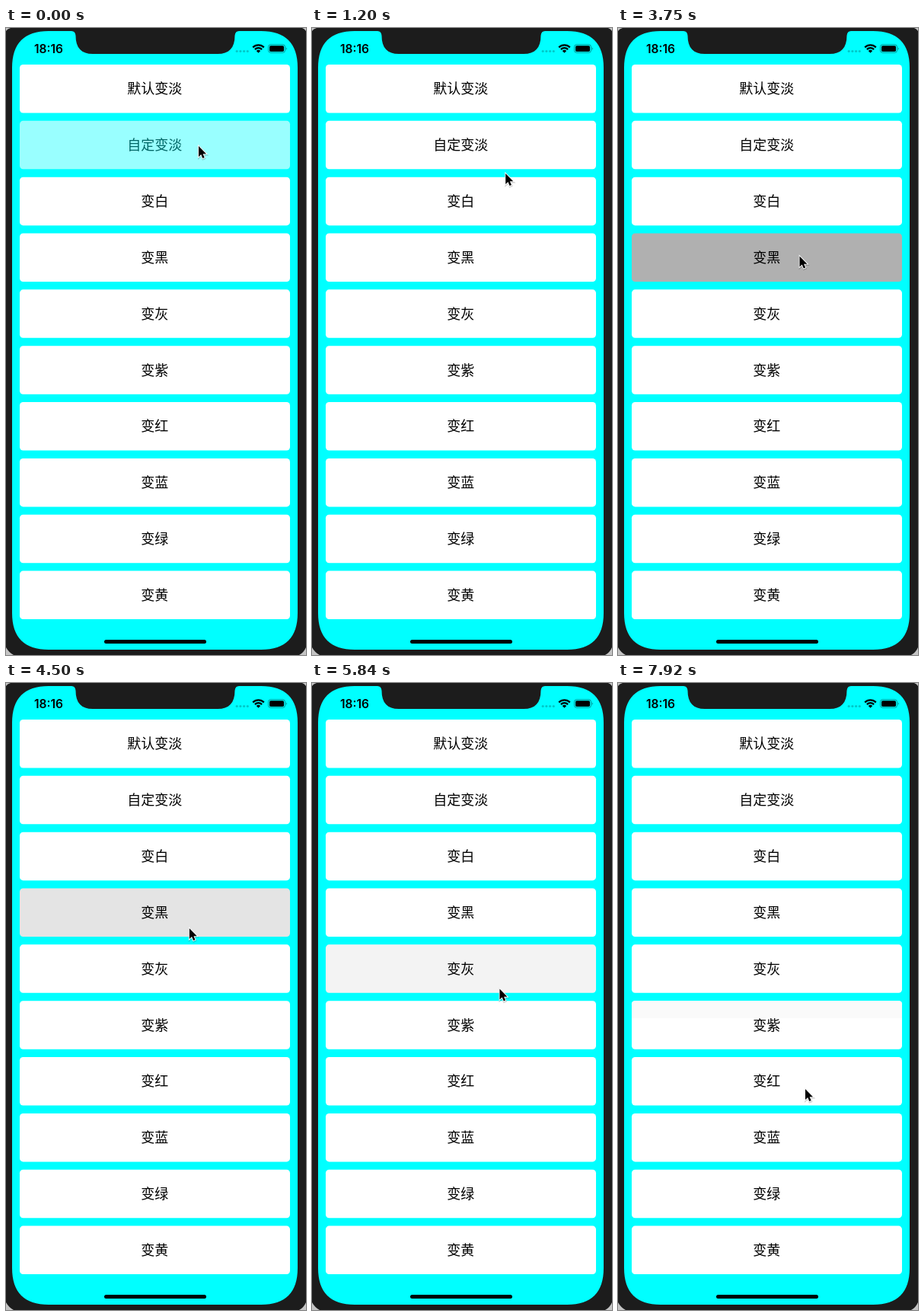
Animation, 394 px wide and 823 px high, one loop 8 s. Source, as an HTML page:

```html
<!DOCTYPE html>
<html lang="zh-CN">
<head>
<meta charset="utf-8">
<title>按钮高亮</title>
<style>
  html, body { margin: 0; width: 100%; height: 100%; overflow: hidden; background: #1c1c1c; }
  svg { display: block; width: 394px; height: 823px; }
  text { text-anchor: middle; }
  .label { font: 18px "Noto Sans CJK SC", "Noto Sans CJK", sans-serif; }
  .clock { font: 600 15.5px Inter, sans-serif; }
</style>
</head>
<body>
<svg viewBox="0 0 394 823">
  <rect width="394" height="823" fill="#1c1c1c"/>
  <path fill="#c4c4c4" d="M0 0H6Q2 1 0 4ZM394 0H389Q392 1 394 4ZM0 823V813Q4 820 10 823ZM394 823V813Q391 820 385 823Z"/>
  <path fill="#0ff" d="M8 52C8 20 24 4 56 4H86Q91 4 91.5 10C91.5 26 99 34 114 34H278C293 34 300.500 26 300.500 10Q301 4 306 4H335C367 4 383 20 383 52V768C383 800 367 816 335 816H56C24 816 8 800 8 768Z"/>
  <text class="clock" x="56" y="32.500">18:16</text>
  <g fill="#000" fill-opacity=".22">
    <circle cx="303.200" cy="30.500" r="1.600"/><circle cx="307.900" cy="30.500" r="1.600"/>
    <circle cx="312.600" cy="30.500" r="1.600"/><circle cx="317.300" cy="30.500" r="1.600"/>
  </g>
  <g transform="translate(331.500 32.700)">
    <path d="M0 0L-2.700 -2.700A3.800 3.800 0 0 1 2.700 -2.700Z"/>
    <path fill="none" stroke="#000" stroke-width="2.200" d="M-4.600 -4.600A6.500 6.500 0 0 1 4.600 -4.600M-7.300 -7.300A10.300 10.300 0 0 1 7.300 -7.300"/>
  </g>
  <rect x="344.500" y="21.800" width="22" height="10.600" rx="3" fill="none" stroke="#000" stroke-opacity=".4"/>
  <rect x="346" y="23.300" width="19" height="7.600" rx="1.700"/>
  <path fill-opacity=".45" d="M367.800 25.200Q370 27 367.800 29Z"/>
  <rect x="129" y="803" width="134" height="5" rx="2.500"/>
  <g id="rows"></g>
  <g id="cursor">
    <path fill="none" stroke="#000" stroke-opacity=".18" stroke-width="2.500" transform="translate(.3 1)" d="M0 0V14L3.200 11L5.300 16L7.700 15L5.600 10.200H10Z"/>
    <path stroke="#fff" stroke-width="1.800" paint-order="stroke" d="M0 0V14L3.200 11L5.300 16L7.700 15L5.600 10.200H10Z"/>
  </g>
</svg>
<script>
const LOOP = 8000, STEP = 150;
const CLOCK_ORIGINS = [0, 5090, 6430, 7920];
const LABELS = ['默认变淡', '自定变淡', '变白', '变黑', '变灰', '变紫', '变红', '变蓝', '变绿', '变黄'];

// Each press tints its row, or fades the whole row when it has no tint.
const PRESSES = [
  { row: 1, down: -123, up: 719 },
  { row: 3, down: 3634, up: 4325, tint: [128, 128, 128] },
  { row: 4, down: 5028, up: 5660, tint: [192, 192, 192] },
  { row: 5, down: 6360, up: 7150, tint: [192, 128, 192] },
];

// time, x, y of the pointer tip
const POINTER = [
  [0, 253, 155], [900, 253, 155], [1500, 255.5, 227],
  [2400, 255.5, 227], [2550, 254.5, 227], [2950, 211, 265],
  [3150, 226, 307], [3300, 238.5, 299.5], [4350, 238.5, 299.5],
  [4800, 247.5, 386.5], [5690, 247.5, 386.5], [6140, 243.5, 444.5],
  [7300, 243.5, 444.5], [7920, 246, 533], [8000, 246, 533],
];

const SVG_NS = 'http://www.w3.org/2000/svg';
function add(parent, name, attributes, text = '') {
  const node = document.createElementNS(SVG_NS, name);
  for (const key in attributes) node.setAttribute(key, attributes[key]);
  node.textContent = text;
  return parent.appendChild(node);
}

const rowsRoot = document.getElementById('rows');
const cursor = document.getElementById('cursor');
const rows = LABELS.map((label, i) => {
  const y = 48 + 73.84 * i;
  const group = add(rowsRoot, 'g', {});
  const box = add(group, 'rect', { x: 18, y, width: 355, height: 63.5, rx: 4.5, fill: '#fff' });
  const band = i === 5 && add(group, 'path', { d: `M18 440V${y + 4}Q18 ${y} 22 ${y}H369Q373 ${y} 373 ${y + 4}V440Z`, fill: '#fafafa' });
  add(group, 'text', { class: 'label', x: 195.2, y: y + 38.3 }, label);
  return { group, box, band };
});

function ease(u) {
  const v = Math.min(1, Math.max(0, u));
  return v * v * (3 - 2 * v);
}

function snap(t) {
  const origin = CLOCK_ORIGINS.findLast(start => start <= t);
  return origin + Math.floor((t - origin) / STEP) * STEP;
}

function pointerAt(t) {
  const i = POINTER.findIndex(key => key[0] > t);
  const [t0, x0, y0] = POINTER[i - 1], [t1, x1, y1] = POINTER[i];
  const u = ease((t - t0) / (t1 - t0));
  return [x0 + (x1 - x0) * u, y0 + (y1 - y0) * u];
}

function draw(time) {
  const t = snap(time);
  for (const { row, down, up, tint } of PRESSES) {
    const level = ease((t - down) / 200) - ease((t - up) / 250);
    const { group, box } = rows[row];
    if (tint) box.setAttribute('fill', `rgb(${tint.map(c => Math.round(255 + (c - 255) * level))})`);
    else group.setAttribute('opacity', 1 - 0.6 * level);
  }
  rows[5].band.setAttribute('visibility', t >= 7480 ? 'visible' : 'hidden');
  cursor.setAttribute('transform', `translate(${pointerAt(t)})`);
}

const start = performance.now();
function tick() {
  draw((performance.now() - start) % LOOP);
  requestAnimationFrame(tick);
}
tick();
</script>
</body>
</html>
```
